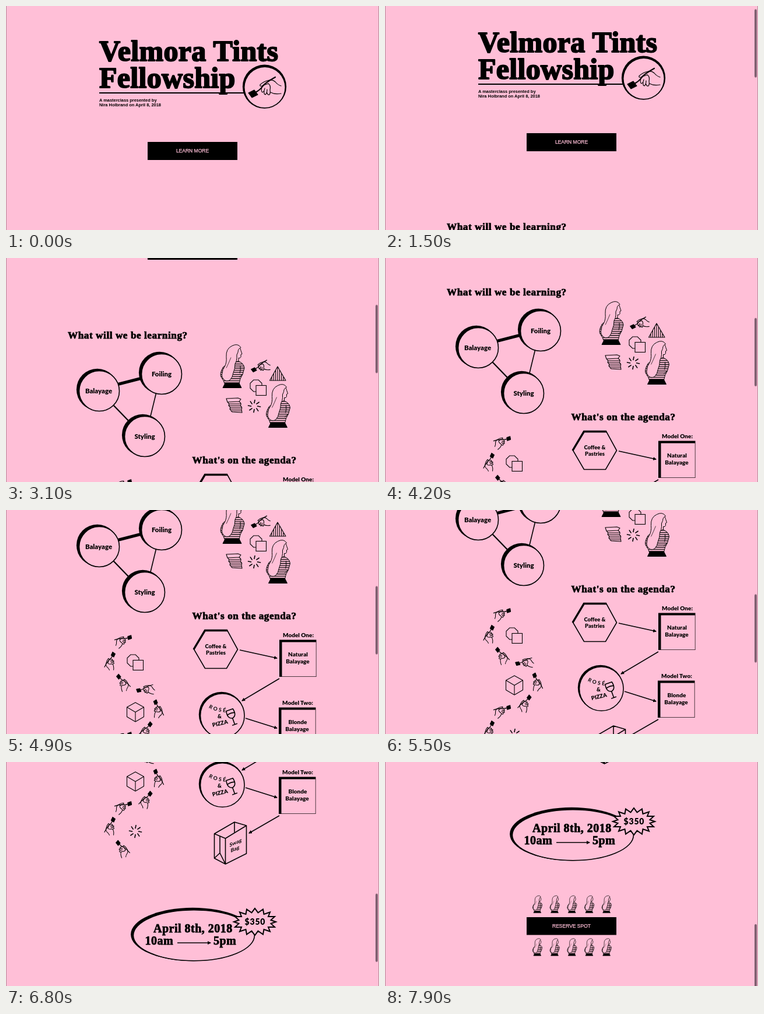
These frames come from a looping animation (640x384 px, 8000 ms). An HTML page without scripts:

```html
<!DOCTYPE html>
<html lang="en">
<head>
<meta charset="utf-8">
<title>Colour class</title>
<style>
@property --scroll { syntax: '<integer>'; inherits: true; initial-value: 0; }

html, body { margin: 0; width: 100%; height: 100%; overflow: hidden; background: #ffbfd7; }
svg { display: block; width: 640px; height: 384px; animation: scroll 8s -5ms infinite; }

.page { transform: translateY(calc(var(--scroll) * -1px)); }
.thumb {
  transform: translateY(calc(var(--scroll) * .304px + 1px));
  animation: show 8s -5ms step-end infinite;
}

/* wheel scrolling in 100 ms ticks */
@keyframes scroll {
  0%     { --scroll: 0; }
  17.5%  { --scroll: 0;   animation-timing-function: steps(2); }
  20%    { --scroll: 30;  animation-timing-function: steps(4); }
  25%    { --scroll: 127; animation-timing-function: steps(4); }
  30%    { --scroll: 187; animation-timing-function: steps(7); }
  38.75% { --scroll: 261; animation-timing-function: steps(1); }
  40%    { --scroll: 262; }
  47.5%  { --scroll: 262; animation-timing-function: steps(2); }
  50%    { --scroll: 300; animation-timing-function: steps(5); }
  56.25% { --scroll: 387; animation-timing-function: steps(4); }
  61.25% { --scroll: 426; animation-timing-function: steps(6); }
  68.75% { --scroll: 472; animation-timing-function: steps(1); }
  70%    { --scroll: 500; animation-timing-function: steps(4); }
  75%    { --scroll: 650; animation-timing-function: steps(2); }
  77.5%  { --scroll: 702; animation-timing-function: steps(2); }
  80%    { --scroll: 725; }
  83.75% { --scroll: 725; animation-timing-function: steps(1); }
  85%    { --scroll: 739; animation-timing-function: steps(4); }
  90%    { --scroll: 855; animation-timing-function: steps(2); }
  92.5%  { --scroll: 890; animation-timing-function: steps(2); }
  95%    { --scroll: 908; animation-timing-function: steps(3); }
  98.75%, 100% { --scroll: 911; }
}
@keyframes show { 0% { opacity: 0; } 18.75%, 100% { opacity: 1; } }

.serif { font: 700 17.2px 'Liberation Serif', serif; letter-spacing: .55px; stroke: #000; stroke-width: .75; stroke-linejoin: round; }
.title { font-size: 50px; letter-spacing: .3px; stroke-width: 2; }
.date { font-size: 20px; letter-spacing: .5px; }
.note { font: 700 7.45px 'Liberation Sans', sans-serif; }
.btn { font: 8.5px 'Liberation Sans', sans-serif; fill: #ffbfd7; stroke: #ffbfd7; stroke-width: .25; text-anchor: middle; }
.label { font: 900 10px Lato, sans-serif; text-anchor: middle; }
.topic { font-size: 11.4px; }
.small { font-size: 9.4px; }
.tag { font-size: 8.8px; font-weight: 700; }
.price { font-size: 14px; letter-spacing: .8px; }
.line { fill: none; stroke: #000; stroke-width: 1.1; stroke-linecap: round; stroke-linejoin: round; }
.bold { stroke-width: 1.6; }
.face { fill: #ffbfd7; stroke: #000; stroke-width: 1.6; }
.thin { stroke-width: 1.1; }
.arrow { stroke: #000; stroke-width: 1.6; marker-end: url(#tip); }
</style>
</head>
<body>
<svg viewBox="0 0 640 384">
  <defs>
    <marker id="tip" markerUnits="userSpaceOnUse" markerWidth="7" markerHeight="6" refX="5" refY="3" orient="auto">
      <path d="M0 0L6 3L0 6Z"/>
    </marker>
    <pattern id="stripes" width="8" height="3.6" patternUnits="userSpaceOnUse">
      <rect width="8" height="3.6" fill="#ffbfd7"/>
      <rect width="8" height="1.3"/>
    </pattern>

    <g id="hand" stroke-linecap="round" stroke-linejoin="round" fill="none" stroke="#000">
      <path d="M-28 10L-18 5L-12 13L-22 18Z" fill="#000"/>
      <path d="M-16 9Q-8 5 -4 -1T18 -17" stroke-width="2.2"/>
      <path d="M28 -2Q22 -4 18 -9Q14 -13 8 -12Q-2 -10 -8 -4Q-9 -1 -5 -2L6 -6M28 11Q17 13 10 9"/>
      <path d="M-5 0Q-7 7 -4 9Q-1 8 0 2M-1 7Q-2 12 1 13Q4 11 4 4M4 10Q5 14 8 13Q10 10 9 5M6 -6Q11 -3 9 5"/>
    </g>

    <g id="woman" stroke="#000" stroke-linejoin="round">
      <path d="M28 27Q42 30 43 40L40 51Q35 58 34 67H9Q8 62 4 57Q-1 51 7 38Z" fill="url(#stripes)"/>
      <path d="M36 36Q37 44 35 49M40 51L34 56" fill="none"/>
      <path d="M30 3Q36 4 37 10L39 16L37 17V21Q36 24 33 23V28L28 30Z" fill="#ffbfd7"/>
      <path d="M22 2Q32 -3 37 5Q32 7 32 13Q29 17 30 23Q30 28 27 33Q27 42 24 48Q23 56 18 61Q12 64 8 60Q3 55 5 49Q5 43 9 38Q13 31 12 21Q11 7 22 2Z" fill="#ffbfd7"/>
      <path d="M20 22Q16 32 12 40" fill="none" stroke-width=".7"/>
      <path d="M10 66H34L38 74H6Z"/>
    </g>

    <g id="shapes" class="face thin">
      <path d="M-4.2 -10H4.2L10 -4.2V4.2L4.2 10H-4.2L-10 4.2V-4.2Z"/>
      <rect x="0" y="-.5" width="17.5" height="17"/>
    </g>

    <path id="ray" d="M5.5 0L10.5 1"/>
    <g id="spark" class="line bold">
      <use href="#ray"/><use href="#ray" transform="rotate(45)"/><use href="#ray" transform="rotate(90)"/>
      <use href="#ray" transform="rotate(135)"/><use href="#ray" transform="rotate(180)"/><use href="#ray" transform="rotate(225)"/>
      <use href="#ray" transform="rotate(270)"/><use href="#ray" transform="rotate(315)"/>
    </g>

    <g id="disc">
      <circle cx="-3.4" cy="-2.5" r="35.7"/>
      <circle r="34.5" class="face"/>
    </g>
    <g id="box">
      <rect x="-32.5" y="-32.5" width="63.5" height="63.5"/>
      <rect x="-28" y="-28.5" width="58.3" height="58.8" fill="#ffbfd7"/>
    </g>
    <g id="row" stroke-width="1.7">
      <use href="#woman" transform="scale(.4)"/>
      <use href="#woman" transform="translate(29.7) scale(.4)"/>
      <use href="#woman" transform="translate(59.4) scale(.4)"/>
      <use href="#woman" transform="translate(89.1) scale(.4)"/>
      <use href="#woman" transform="translate(118.8) scale(.4)"/>
    </g>
    <path id="smile" d="M346 763.5Q356 772 382 773"/>
  </defs>

  <rect width="640" height="384" fill="#ffbfd7"/>

  <g class="page">
    <!-- header -->
    <rect x="160" y="148" width="250" height="2"/>
    <text x="160" y="94.3" class="serif title">Velmora Tints</text>
    <text x="160" y="140" class="serif title">Fellowship</text>
    <circle cx="443.5" cy="138.2" r="37.6"/>
    <circle cx="444" cy="139.6" r="34.5" fill="#ffbfd7"/>
    <use href="#hand" x="444" y="139" stroke-width="1.2"/>
    <text x="160" y="163.5" class="note">A masterclass presented by</text>
    <text x="160" y="172.2" class="note">Nira Holbrand on April 8, 2018</text>
    <rect x="243" y="233" width="154" height="31"/>
    <text x="320" y="251.2" class="btn">LEARN MORE</text>

    <!-- topics -->
    <text x="106" y="398.5" class="serif">What will we be learning?</text>
    <g stroke="#000">
      <path d="M192 477.5L233 467" stroke-width="5"/>
      <path d="M183 512L213 543" stroke-width="2.2"/>
      <path d="M257.5 493L248 532" stroke-width="1.6"/>
    </g>
    <use href="#disc" x="160" y="489"/>
    <use href="#disc" x="267" y="460"/>
    <use href="#disc" x="238" y="567"/>
    <text x="159" y="493" class="label topic">Balayage</text>
    <text x="267" y="464" class="label topic">Foiling</text>
    <text x="238" y="571" class="label topic">Styling</text>

    <use href="#woman" x="366" y="409.5" stroke-width="1"/>
    <use href="#woman" x="444.5" y="477.5" stroke-width="1"/>
    <use href="#hand" transform="translate(437 446) scale(.58)" stroke-width="1.9"/>
    <use href="#shapes" x="429" y="480"/>
    <use href="#spark" x="426" y="515"/>
    <path class="line" d="M466 447L452.5 471H480ZM456 465V471M459.3 459V471M462.6 453V471M466 447V471M469.4 453V471M472.7 459V471M476 465V471"/>
    <path class="line" d="M378 502L398 501L403 503L400 507L380 508ZM380 508Q384 511 382 514L402 514Q405 511 400 507M382 514Q386 517 384 520L404 520Q406 517 402 514M384 520L388 525L405 526L404 520M383 511H402M385 517H404M386 523H404"/>

    <!-- hands column -->
    <g stroke-width="1.9">
      <use href="#hand" transform="translate(200 648) rotate(-46) scale(-.55 .55)"/>
      <use href="#hand" transform="translate(178 685) rotate(-92) scale(-.55 .55)"/>
      <use href="#hand" transform="translate(202 721) rotate(77) scale(.55)"/>
      <use href="#hand" transform="translate(240 732) rotate(15) scale(.55)"/>
      <use href="#hand" transform="translate(262 767) rotate(95) scale(.55)"/>
      <use href="#hand" transform="translate(239 803) rotate(-79) scale(-.55 .55)"/>
      <use href="#hand" transform="translate(200 814) rotate(-46) scale(-.55 .55)"/>
      <use href="#hand" transform="translate(178 849) rotate(-92) scale(-.55 .55)"/>
      <use href="#hand" transform="translate(201 887) rotate(77) scale(.55)"/>
    </g>
    <use href="#shapes" x="218" y="684"/>
    <path class="line" d="M222 756L236.5 764V780.5L222 789L207.5 780.5V764ZM207.5 764L222 772.5L236.5 764M222 772.5V789"/>
    <use href="#spark" x="222" y="858"/>

    <!-- agenda -->
    <text x="319.5" y="612.5" class="serif">What's on the agenda?</text>
    <path class="face" d="M322 664L341 632H379.5L397.5 665L378.5 697.5H341.5Z"/>
    <path d="M322 665L341.5 632.5H380" fill="none" stroke="#000" stroke-width="3.4"/>
    <text x="360" y="663.3" class="label small">Coffee &amp;</text>
    <text x="360" y="674.3" class="label small">Pastries</text>

    <text x="501.5" y="644.3" class="label">Model One:</text>
    <use href="#box" x="501.5" y="681"/>
    <text x="501" y="677.3" class="label">Natural</text>
    <text x="500.5" y="688.5" class="label">Balayage</text>

    <text x="500.5" y="760.3" class="label">Model Two:</text>
    <use href="#box" x="500.5" y="797"/>
    <text x="500.5" y="793.3" class="label">Blonde</text>
    <text x="499.5" y="804.5" class="label">Balayage</text>

    <circle cx="369.8" cy="776.7" r="39"/>
    <circle cx="371.3" cy="778.5" r="37.8" class="face"/>
    <text class="label tag" letter-spacing="2.8"><textPath href="#smile" startOffset="50%">ROSÉ</textPath></text>
    <text x="366.5" y="782.5" class="label small">&amp;</text>
    <text transform="translate(368 795) rotate(-13)" class="label small">PIZZA</text>
    <g transform="translate(388 781) rotate(-20)">
      <path class="line bold" d="M-6 -13H6Q9 0 0 2Q-9 0 -6 -13ZM-6.5 -6Q0 -8 6.5 -6M0 2V13M-4 13.5H4"/>
    </g>

    <path class="arrow" d="M401 666L465 680"/>
    <path class="arrow" d="M469 715L405 753"/>
    <path class="arrow" d="M411 783L465 800"/>
    <path class="arrow" d="M469 831L417 861"/>

    <path class="line bold" d="M357.5 862L392 842L412.5 848V896L376.5 914L357.5 904ZM357.5 862L376.5 870L412.5 848M376.5 870V914M392 842V859M367 867V895L357.5 904M367 895L376.5 914"/>
    <text transform="translate(394 880) skewY(-24)" class="label tag">Swag</text>
    <text transform="translate(393 891) skewY(-24)" class="label tag">Bag</text>

    <!-- date and price -->
    <ellipse cx="320.3" cy="1034.5" rx="106.2" ry="45.7"/>
    <ellipse cx="322.4" cy="1036.2" rx="104" ry="43.5" class="face"/>
    <text x="253" y="1031.3" class="serif date">April 8th, 2018</text>
    <text x="238.5" y="1052.3" class="serif date">10am</text>
    <path class="arrow" d="M294 1049H351"/>
    <text x="356" y="1052.3" class="serif date">5pm</text>
    <path transform="translate(427 1013)" class="face" style="stroke-width:2" d="M36 0L27.5 3L34 9L23 9L26 16.5L15.5 13L14 21.5L5.5 15.7L0 23L-5.5 15.7L-14 21.5L-15.5 13L-26 16.5L-23 9L-34 9L-27.5 3L-36 0L-27.5 -3L-34 -9L-23 -9L-26 -16.5L-15.5 -13L-14 -21.5L-5.5 -15.7L0 -23L5.5 -15.7L14 -21.5L15.5 -13L26 -16.5L23 -9L34 -9L27.5 -3Z"/>
    <text x="427.4" y="1018" class="label price">$350</text>

    <!-- booking -->
    <use href="#row" x="252.5" y="1140"/>
    <rect x="243" y="1177" width="154" height="30.5"/>
    <text x="320" y="1195.2" class="btn">RESERVE SPOT</text>
    <use href="#row" x="252.5" y="1213.5"/>
  </g>

  <g fill="#000" fill-opacity=".28">
    <rect width="1" height="384"/>
    <rect x="639" width="1" height="384"/>
  </g>
  <rect class="thumb" x="634" width="4" height="117" rx="2" fill="#806070"/>
</svg>
</body>
</html>
```
